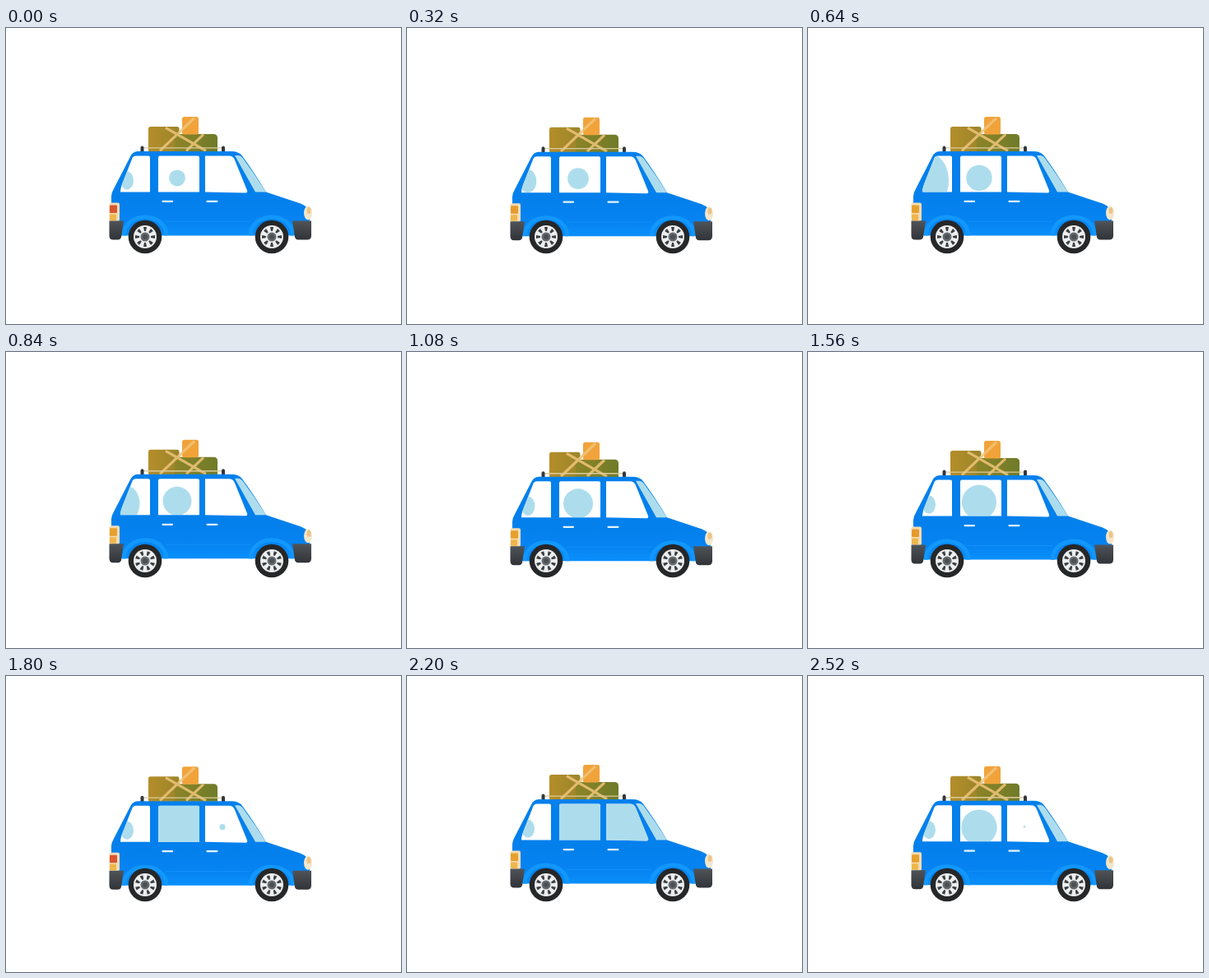
Recreate the animation shown at these times as an HTML page. Size 480 by 360 pixels, loop 2.56 s.

```html
<!DOCTYPE html>
<html lang="en">
<head>
<meta charset="utf-8">
<title>Packed car</title>
<style>
  html, body { margin: 0; width: 100%; height: 100%; overflow: hidden; background: #fff; }
  svg { display: block; width: 480px; height: 360px; }
</style>
</head>
<body>
<svg viewBox="0 0 480 360">
  <defs>
    <linearGradient id="paint" x2="0" y2="1">
      <stop offset=".6" stop-color="#0480ec"/>
      <stop offset=".85" stop-color="#0684f2"/>
      <stop offset="1" stop-color="#0a90fc"/>
    </linearGradient>
    <linearGradient id="bumper" x2="0" y2="1">
      <stop stop-color="#505459"/><stop offset="1" stop-color="#303337"/>
    </linearGradient>
    <linearGradient id="trunk" x2="1">
      <stop stop-color="#b58d2a"/><stop offset="1" stop-color="#9a862a"/>
    </linearGradient>
    <linearGradient id="case" x2="1">
      <stop stop-color="#8c8428"/><stop offset="1" stop-color="#6f7b29"/>
    </linearGradient>
    <path id="pane0" d="M158 155H173Q175 155 175 157V199H139Q139 194 142 187L153 159Q154 155 158 155Z"/>
    <path id="pane1" d="M187 155H233Q235 155 235 157V199H185V157Q185 155 187 155Z"/>
    <path id="pane2" d="M242 155H271Q276 155 278 160L293 197Q294 200 291 200L242 199Z"/>
    <clipPath id="clip0"><use href="#pane0"/></clipPath>
    <clipPath id="clip1"><use href="#pane1"/></clipPath>
    <clipPath id="clip2"><use href="#pane2"/></clipPath>
    <g id="wheel">
      <circle r="20.300" fill="#262728"/>
      <circle r="14" fill="#eceeef"/>
      <g id="spokes"></g>
      <circle r="5.500" fill="#64696d"/>
      <circle r="3" fill="#4b5054"/>
    </g>
  </defs>

  <g id="car">
    <rect x="173" y="119.500" width="37.500" height="31" rx="2.500" fill="url(#trunk)"/>
    <path d="M205 150V128.500H253Q257 129 257 133V150Z" fill="url(#case)"/>
    <rect x="214" y="107.500" width="20" height="21.500" rx="2.500" fill="#f1a33a"/>
    <g fill="none" stroke="#f0c57a" stroke-width="3.200" stroke-opacity=".85">
      <path d="M187 149L229 109M194 121L243 149M219 149L240 129"/>
    </g>
    <path d="M166 145.500H264" stroke="#dccb9c" stroke-width="1.400"/>
    <path d="M165.500 145V151M264 145V151" stroke="#33383d" stroke-width="4" stroke-linecap="round"/>

    <path d="M160 149.500H274Q283 149.500 287 155Q301 174 316 199L358 213Q368 217 369 225V246L349 252H141L128 246V204Q128 200 131 195L151 156Q154 149.500 160 149.500Z" fill="url(#paint)"/>
    <path d="M143 252C144 222 194 222 195 252M297 252C298 222 348 222 349 252" fill="none" stroke="#1297fc" stroke-width="5"/>
    <path d="M194 235H297" stroke="#1490f8"/>

    <g fill="#fff">
      <use href="#pane0"/><use href="#pane1"/><use href="#pane2"/>
    </g>
    <g fill="#addded">
      <g clip-path="url(#clip0)"><ellipse id="rear" cx="147" cy="185"/></g>
      <g clip-path="url(#clip1)"><ellipse id="middle" cx="208" cy="182"/></g>
      <g clip-path="url(#clip2)"><ellipse id="front" cx="263" cy="181"/></g>
      <path d="M278 154.500H283Q286 155 288 158Q302 177 316 199H303Z"/>
    </g>
    <path d="M190.500 210.500H202M244.500 210.500H256.500" stroke="#e5f3fb" stroke-width="2.200" stroke-linecap="round"/>

    <rect x="125.500" y="212" width="12.500" height="22.500" rx="2" fill="#f3dcb4"/>
    <rect id="signal" x="126" y="215" width="9" height="9.500" rx="1"/>
    <rect x="126" y="226" width="8" height="7.500" rx="1" fill="#efb64c"/>
    <ellipse cx="367" cy="224.500" rx="5" ry="8.500" fill="#f2e6cb"/>
    <ellipse cx="368" cy="221.500" rx="2.500" ry="4" fill="#ecc488"/>
    <path d="M125.500 234H143L140 254Q139 257 136 257H130Q125.500 257 125.500 252Z" fill="url(#bumper)"/>
    <path d="M348 234H371V252Q371 257 366 257H355Q352 257 351 254Z" fill="url(#bumper)"/>
  </g>
  <use href="#wheel" x="169" y="254"/>
  <use href="#wheel" x="323" y="254"/>
</svg>
<script>
const LOOP = 2560, STEP = 40, BOUNCE = 640;
const byId = id => document.getElementById(id);
const set = (id, attrs) => {
  for (const name in attrs) byId(id).setAttribute(name, attrs[name]);
};

for (let i = 0; i < 8; i++) {
  byId('spokes').innerHTML += `<path d="M-1 -7L-2 -12H2L1 -7Z" fill="#3a3e41" transform="rotate(${i * 45})"/>`;
}

const pulse = (t, centre, width) => Math.exp(-(((t - centre) / width) ** 2));

// quick hop up, then a slow settle
function bounceAt(t) {
  const high = -3, low = 2.7, hop = 160;
  const phase = (t + 70) % BOUNCE;
  if (phase < hop) return low + (high - low) * (1 - Math.cos(Math.PI * phase / hop)) / 2;
  const left = 1 - (phase - hop) / (BOUNCE - hop);
  return low + (high - low) * left * left;
}

function draw(now) {
  const t = Math.floor(now % LOOP / STEP) * STEP;
  set('car', { transform: `translate(0 ${bounceAt(t)})` });
  set('spokes', { transform: `rotate(${t / BOUNCE * 360})` });

  const red = Math.min(1, pulse(t, 0, 200) + pulse(t, 1800, 150));
  set('signal', { fill: `rgb(${232 - 14 * red},${160 - 74 * red},45)` });

  // the tint swells in one pane after another
  const rear = pulse(t, 640, 230);
  const middle = 10 + 8 * Math.min(1, t / 900) + 44 * pulse(t, 2050, 300);
  const front = 42 * pulse(t, 2130, 210);
  set('rear', { rx: 8 + 16 * rear, ry: 11 + 22 * rear });
  set('middle', { rx: middle, ry: middle });
  set('front', { rx: front, ry: front });
}

const start = performance.now();
function tick() {
  draw(performance.now() - start);
  requestAnimationFrame(tick);
}
tick();
</script>
</body>
</html>
```
